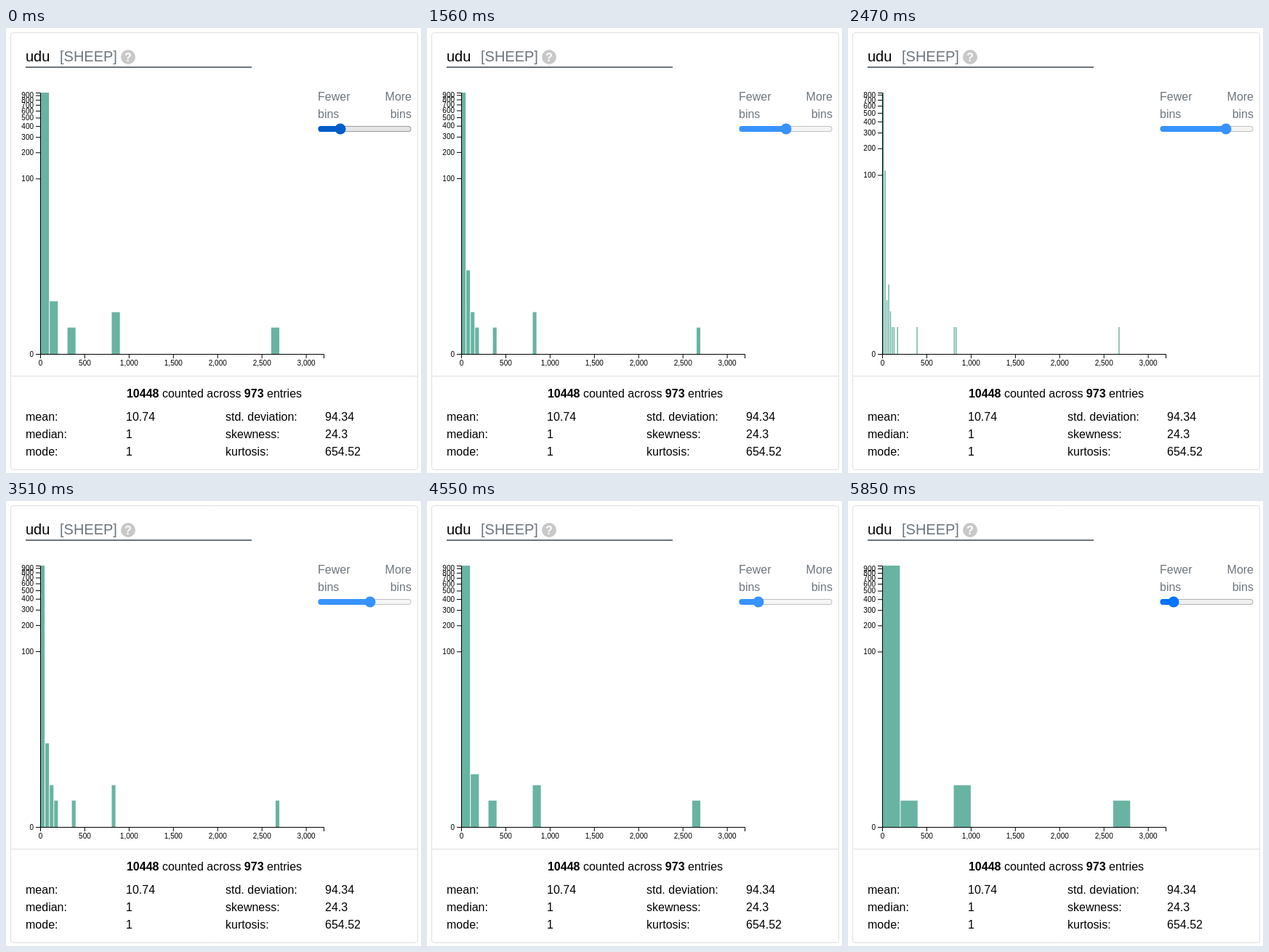
Animation, 571 px wide and 613 px high, one loop 7540 ms. Source, as an HTML page with a canvas:

```html
<!DOCTYPE html>
<html lang="en">
<head>
<meta charset="utf-8">
<title>Histogram with adjustable bins</title>
<style>
  html, body { margin: 0; width: 571px; height: 613px; overflow: hidden; background: #fff; }
  canvas, svg { position: absolute; left: 0; top: 0; display: block; }
  text { font: 16px "Liberation Sans", Arial, sans-serif; fill: #000; white-space: pre; }
  .title { font-size: 20px; }
  .muted { fill: #6c757d; }
  .bold { font-weight: bold; }
  .mid { text-anchor: middle; }
  .end { text-anchor: end; }
</style>
</head>
<body>
<canvas id="stage" width="571" height="613"></canvas>
<svg width="571" height="613">
  <text class="title" x="27" y="46">udu</text>
  <text class="title muted" x="74" y="46">[SHEEP]</text>
  <circle cx="168" cy="40" r="10" fill="#c8c8c8"/>
  <text class="bold mid" x="168" y="46" style="fill:#fff">?</text>
  <text class="muted" x="429" y="100">Fewer</text>
  <text class="muted" x="429" y="124">bins</text>
  <text class="muted end" x="558" y="100">More</text>
  <text class="muted end" x="558" y="124">bins</text>
  <text class="mid" x="286.5" y="509"><tspan class="bold">10448</tspan> counted across <tspan class="bold">973</tspan> entries</text>
  <text x="27" y="541">mean:</text>
  <text x="165" y="541">10.74</text>
  <text x="302" y="541">std. deviation:</text>
  <text x="439" y="541">94.34</text>
  <text x="27" y="565">median:</text>
  <text x="165" y="565">1</text>
  <text x="302" y="565">skewness:</text>
  <text x="439" y="565">24.3</text>
  <text x="27" y="589">mode:</text>
  <text x="165" y="589">1</text>
  <text x="302" y="589">kurtosis:</text>
  <text x="439" y="589">654.52</text>
</svg>
<script>
const ctx = document.getElementById('stage').getContext('2d');
const LOOP = 7540, TICK = 130;
const chart = { x: 47, y: 89, w: 390, h: 360, max: 3200 };
const base = chart.y + chart.h;

// Entry counts by bin width, keyed by the start of each non-empty bin.
const histograms = {
  200: { 0: 969, 200: 1, 800: 2, 2600: 1 },
  100: { 0: 966, 100: 3, 300: 1, 800: 2, 2600: 1 },
  50: { 0: 958, 50: 8, 100: 2, 150: 1, 350: 1, 800: 2, 2650: 1 },
  20: { 0: 844, 20: 112, 40: 3, 60: 5, 80: 2, 100: 1, 120: 1, 160: 1, 380: 1, 800: 1, 820: 1, 2660: 1 }
};

// Drag strokes: start time, number of ticks, first and last thumb position.
const strokes = [
  [260, 2, 460, 463], [650, 5, 467, 489], [1560, 2, 494, 496], [1950, 5, 500, 520],
  [2990, 3, 518, 508], [3510, 6, 501, 473], [4290, 5, 464, 448]
];

const themes = {
  hover: { accent: '#005cc8', track: '#e5e5e5', border: '#9a9a9a' },
  active: { accent: '#3793ff', track: '#f5f5f5', border: '#c1c1c1' },
  idle: { accent: '#0075ff', track: '#efefef', border: '#b2b2b2' }
};

function thumbAt(t) {
  let pos = 460;
  for (const [start, ticks, from, to] of strokes) {
    if (t < start) break;
    const step = Math.min(Math.floor((t - start) / TICK), ticks - 1);
    pos = from + (to - from) * step / (ticks - 1);
  }
  return Math.round(pos);
}

// Rounds the bin width to 1, 2 or 5 times a power of ten.
function binWidth(thumb) {
  const raw = chart.max / (150 * (thumb - 438) / 111);
  const power = 10 ** Math.floor(Math.log10(raw));
  const error = raw / power;
  const factor = error >= Math.sqrt(50) ? 10 : error >= Math.sqrt(10) ? 5 : error >= Math.SQRT2 ? 2 : 1;
  return factor * power;
}

const xOf = value => chart.x + value / chart.max * chart.w;

function rect(color, x, y, w, h) {
  ctx.fillStyle = color;
  ctx.fillRect(x, y, w, h);
}

function roundRect(x, y, w, h, r) {
  ctx.beginPath();
  ctx.roundRect(x, y, w, h, r);
}

function label(text, x, y, align) {
  ctx.textAlign = align;
  ctx.fillText(text, x, y);
}

function drawCard() {
  rect('#fff', 0, 0, 571, 613);
  ctx.lineWidth = 1;
  ctx.strokeStyle = '#dfdfdf';
  roundRect(6.5, 6.5, 560, 602, 3.5);
  ctx.stroke();
  rect('#dfdfdf', 7, 479, 559, 1);
  rect('#6c757d', 27, 53, 311, 2);
}

function drawChart(width) {
  const bins = histograms[width];
  const yOf = n => base - chart.h * Math.log1p(n) / Math.log1p(bins[0]);

  for (const [start, count] of Object.entries(bins)) {
    const y = yOf(count);
    rect('#69b3a2', xOf(+start) + 1, y, width / chart.max * chart.w - 1, base - y);
  }

  ctx.strokeStyle = '#000';
  ctx.lineWidth = 1;
  ctx.beginPath();
  ctx.moveTo(41, chart.y + 0.5);
  ctx.lineTo(chart.x + 0.5, chart.y + 0.5);
  ctx.lineTo(chart.x + 0.5, base + 0.5);
  ctx.lineTo(chart.x + chart.w + 0.5, base + 0.5);
  ctx.lineTo(chart.x + chart.w + 0.5, base + 6);

  ctx.fillStyle = '#000';
  ctx.font = '10px "Liberation Sans", Arial, sans-serif';
  for (let n = 0; n <= bins[0]; n += 100) {
    const y = yOf(n) + 0.5;
    ctx.moveTo(41, y);
    ctx.lineTo(chart.x, y);
    label(n, 38, y + 3.2, 'right');
  }
  for (let v = 0; v <= chart.max; v += 500) {
    const x = xOf(v) + 0.5;
    ctx.moveTo(x, base);
    ctx.lineTo(x, base + 6);
    label(v.toLocaleString('en-US'), x, base + 16.1, 'center');
  }
  ctx.stroke();
}

function drawSlider(thumb, theme) {
  ctx.save();
  roundRect(429.5, 135, 128, 8, 4);
  ctx.fillStyle = theme.border;
  ctx.fill();
  roundRect(430.5, 136, 126, 6, 3);
  ctx.fillStyle = theme.track;
  ctx.fill();
  roundRect(429.5, 135, 128, 8, 4);
  ctx.clip();
  rect(theme.accent, 429, 135, thumb - 429, 8);
  ctx.restore();
  ctx.fillStyle = theme.accent;
  ctx.beginPath();
  ctx.arc(thumb, 139, 7.5, 0, Math.PI * 2);
  ctx.fill();
}

function draw(now) {
  const t = now % LOOP;
  const thumb = thumbAt(t);
  drawCard();
  drawChart(binWidth(thumb));
  drawSlider(thumb, t < 260 ? themes.hover : t < 5850 ? themes.active : themes.idle);
}

const origin = performance.now();
function frame() {
  draw(performance.now() - origin);
  requestAnimationFrame(frame);
}
frame();
</script>
</body>
</html>
```
